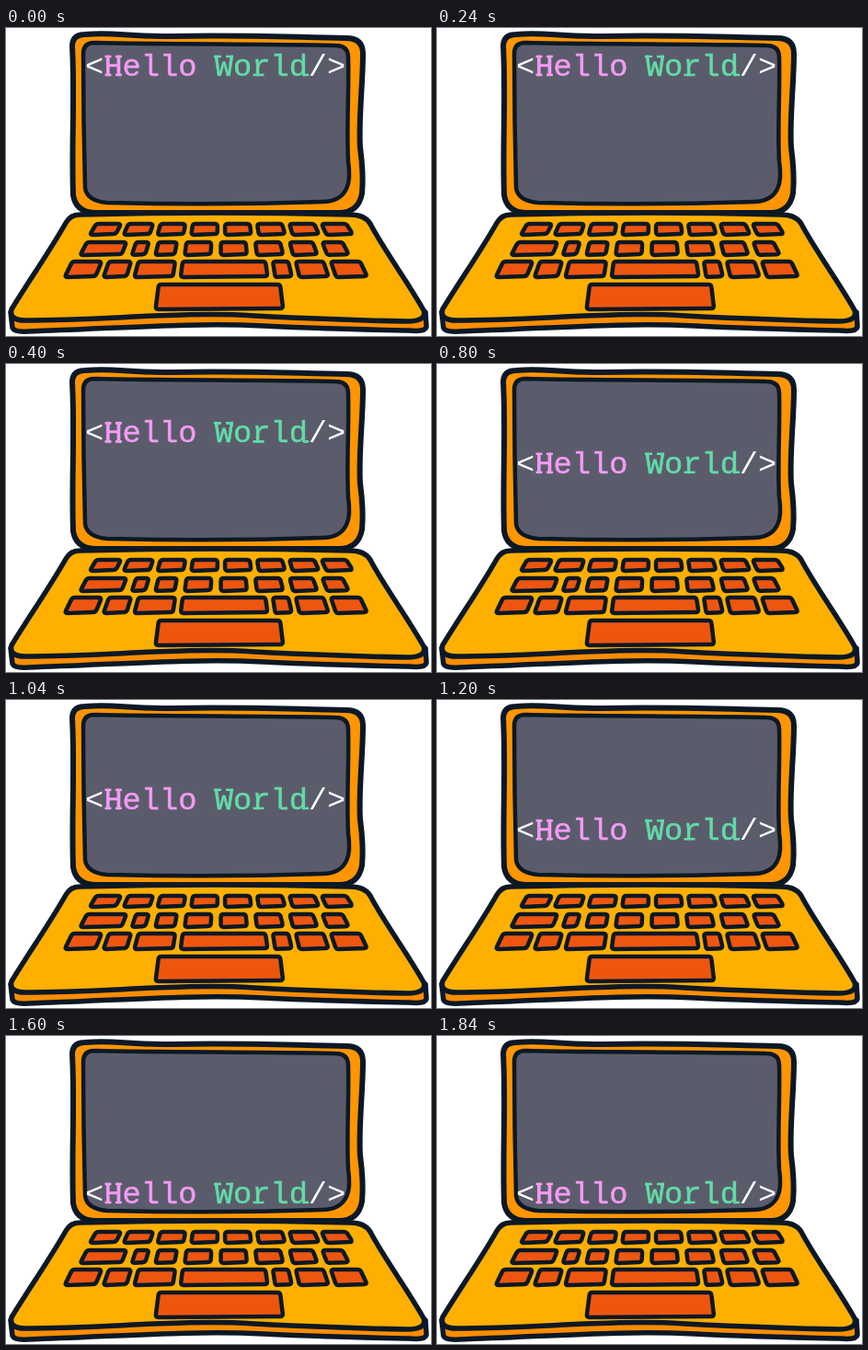
Write an HTML page that moves like this. It is 462 px wide and 335 px high and loops after 2000 ms.

```html
<!DOCTYPE html>
<html lang="en">
<head>
<meta charset="utf-8">
<title>Hello World laptop</title>
<style>
  html, body { margin: 0; width: 100%; height: 100%; overflow: hidden; background: #fff; }
  svg { display: block; width: 462px; height: 335px; }
  .ink { stroke: #0b1825; stroke-linejoin: round; stroke-linecap: round; }
  text { font: 33.7px "Liberation Mono", monospace; white-space: pre; }
  .slab { stroke: currentColor; stroke-width: 0.5; fill: currentColor; }
  .serif { fill: none; stroke: currentColor; stroke-width: 2.6; }
</style>
</head>
<body>
<svg viewBox="0 0 462 335">
  <!-- lid and screen -->
  <path class="ink" fill="#ff9500" stroke-width="6"
    d="M72 20 Q72 7 86 7 C120 4 130 10 180 9 C250 7 310 10 370 11 Q388 11 388 28
       C388 60 383 100 385 130 Q389 160 387 180 Q383 201 362 201 L96 201 Q76 200 73 182 C71 130 75 75 72 20Z"/>
  <path class="ink" fill="#5a5c6b" stroke-width="4.5"
    d="M84 28 Q84 16 96 16 C180 18 275 17 358 19 Q372 19 372 32 C373 70 370 110 372 145
       Q375 165 370 175 Q363 189 344 189 Q230 193 110 190 Q88 188 86 174 Q84 100 84 28Z"/>
  <!-- base: front edge, then keyboard deck -->
  <path class="ink" fill="#fb8d00" stroke-width="5.5"
    d="M5 309 L7 326 Q9 331 24 330 C120 327 200 320 280 324 C340 327 390 328 438 329 Q456 331 457 325 L456 309Z"/>
  <path class="ink" fill="#ffaf00" stroke-width="5.5"
    d="M80 203 Q70 203 65 212 C48 242 23 278 6 306 Q3 318 21 318 C110 318 190 308 270 313
       C330 316 380 318 436 319 Q458 319 454 307 C438 278 410 240 396 213 Q390 203 374 203 Q230 199 80 203Z"/>
  <g id="keys" class="ink" fill="#ee560f" stroke-width="4.5"></g>
  <g id="message">
    <text x="86" fill="#fff">&lt;</text>
    <g color="#f39bf3">
      <text class="slab" x="106.4">Hello</text>
      <path class="serif" d="M107.5 -1h7m4.5 0h7M107.5 -21h7m4.5 0h7"/>
    </g>
    <g color="#63dba7">
      <text class="slab" x="226.8">World</text>
      <path class="serif" d="M226 -21h8m5 0h8M268.5 -1h12M324 -1h5"/>
    </g>
    <text x="328.8" fill="#fff">/&gt;</text>
  </g>
</svg>
<script>
  const keyRows = [
    { left: 98, top: 213, height: 12, gap: 8, widths: Array(8).fill(27) },
    { left: 88, top: 233, height: 14, gap: 10.4, widths: [43, 14, 20, 27, 27, 27, 25, 22] },
    { left: 72, top: 254, height: 17, gap: 8, widths: [32, 24, 40, 90, 17, 30, 32] },
    { left: 166, top: 279, height: 27, gap: 0, widths: [132] }
  ];

  // Keys widen towards the viewer, away from the deck's centre line.
  const spread = x => 235 + (x - 235) * 1.05;

  function roundedShape(points, radius) {
    const towards = ([x, y], [u, v]) => {
      const t = radius / Math.hypot(u - x, v - y);
      return [x + (u - x) * t, y + (v - y) * t];
    };
    const corners = points.map((point, i) => {
      const before = points.at(i - 1), after = points[(i + 1) % points.length];
      return `${towards(point, before)} Q${point} ${towards(point, after)}`;
    });
    return `M${corners.join(" L")}Z`;
  }

  function drawRow({ left, top, height, gap, widths }) {
    const bottom = top + height;
    let x = left;
    return widths.map(width => {
      const end = x + width;
      const corners = [[x, top], [end, top], [spread(end), bottom - 1], [spread(x), bottom]];
      x = end + gap;
      return `<path d="${roundedShape(corners, 3)}"/>`;
    }).join("");
  }

  document.getElementById("keys").innerHTML = keyRows.map(drawRow).join("");

  const message = document.getElementById("message");
  const stepMs = 400, steps = 5;

  // The line drops in equal steps and stops at the bottom of the screen.
  function draw() {
    const step = Math.floor(performance.now() / stepMs) % steps;
    const baseline = Math.min(52 + step * 33.4, 182);
    message.setAttribute("transform", `translate(0 ${baseline})`);
    requestAnimationFrame(draw);
  }
  draw();
</script>
</body>
</html>
```
